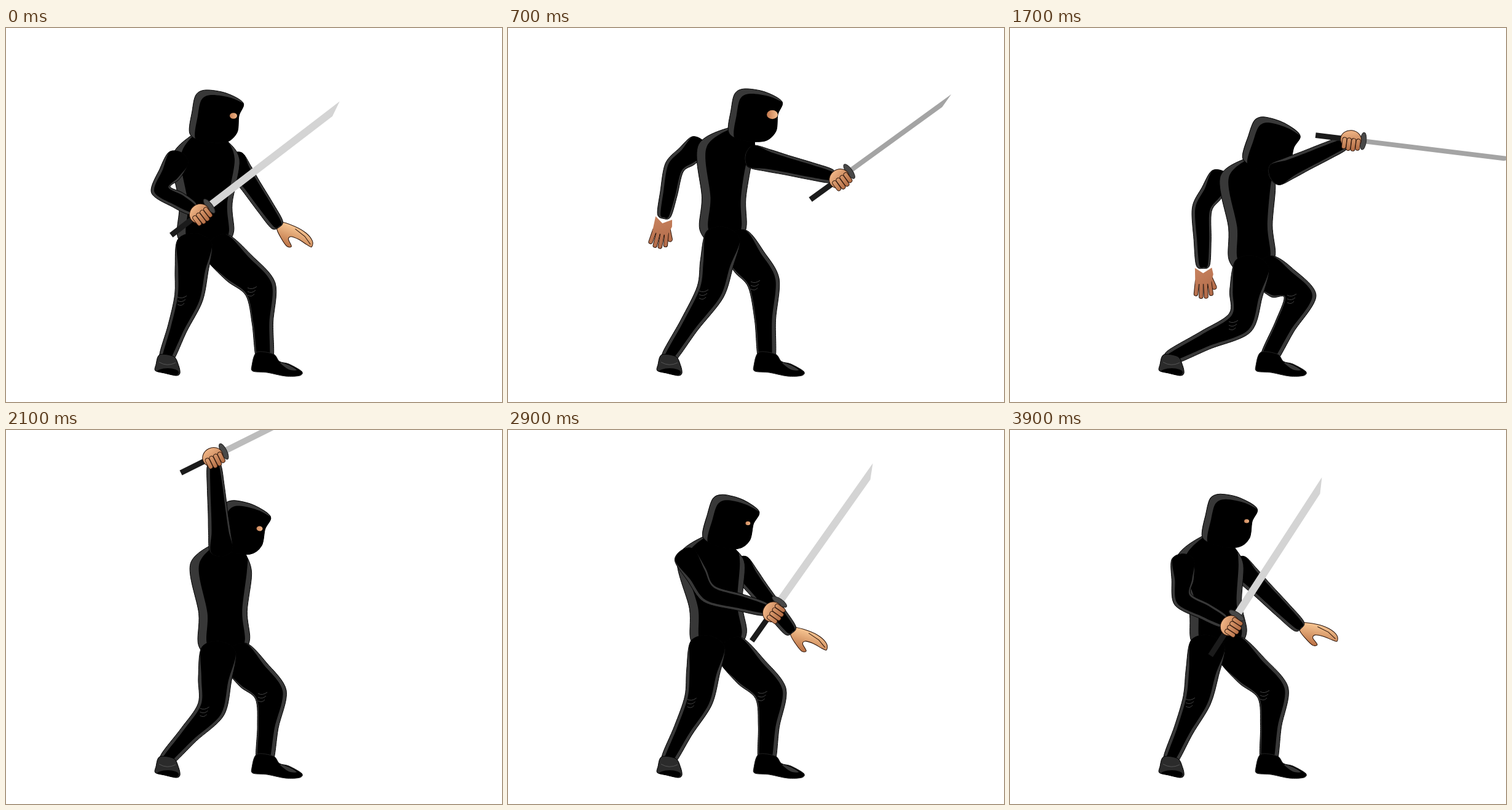
These frames come from a looping animation (807x609 px, 4 s). An HTML page with a canvas:

```html
<!DOCTYPE html>
<html lang="en">
<head>
<meta charset="utf-8">
<title>Sword practice</title>
<style>
html, body { margin: 0; width: 100%; height: 100%; overflow: hidden; background: #fff; }
canvas { display: block; width: 807px; height: 609px; }
</style>
</head>
<body>
<canvas id="stage" width="807" height="609"></canvas>
<script>
const g = document.getElementById('stage').getContext('2d');
const LOOP = 4000, STEP = 100;
const RIM = '#383838', INK = '#000', SKIN_LINE = '#2b150b';
const BACK_ANKLE = [261, 537], FRONT_ANKLE = [421, 537];

// turn: 0 faces us, 1 shows the back. grip: degrees and distance from the chest.
// blade: degrees, length. flex: how far the sword elbow sticks out.
const poses = {
  ready: { head: [342, 145, 0], chest: [325, 212], hips: [325, 335], knees: [297, 440, 414, 425],
    wrist: [441, 320], grip: [96, 90], blade: [-37.5, 272], turn: [0], flex: [-46], eye: [6] },
  raised: { head: [344, 129, .03], chest: [313, 200], hips: [316, 318], knees: [293, 430, 390, 425],
    wrist: [420, 325], grip: [194, 182], blade: [-60, 270], turn: [0], flex: [0], eye: [10] },
  cut: { head: [402, 143, 0], chest: [353, 205], hips: [350, 325], knees: [329, 430, 416, 415],
    wrist: [254, 305], grip: [372, 191], blade: [-36, 208], turn: [1], flex: [0], eye: [9] },
  coil: { head: [434, 194, .3], chest: [385, 240], hips: [370, 365], knees: [368, 478, 435, 427],
    wrist: [222, 292], grip: [424, 101], blade: [-91, 184], turn: [1], flex: [20], eye: [3] },
  sweep: { head: [425, 191, .15], chest: [387, 250], hips: [394, 372], knees: [374, 480, 472, 437],
    wrist: [314, 386], grip: [338, 182], blade: [7, 255], turn: [1], flex: [0], eye: [0] },
  low: { head: [365, 154, .12], chest: [333, 215], hips: [347, 338], knees: [312, 442, 433, 430],
    wrist: [465, 326], grip: [429, 122], blade: [-54, 272], turn: [0], flex: [-36], eye: [3] },
  rest: { head: [357, 149, .05], chest: [325, 215], hips: [340, 335], knees: [304, 440, 428, 428],
    wrist: [470, 319], grip: [432, 108], blade: [-57, 264], turn: [0], flex: [-38], eye: [4] }
};

const smooth = k => k * k * (3 - 2 * k), strike = k => k * k;
const beats = [
  [0, 'ready'], [300, 'raised'], [420, 'raised'], [700, 'cut', strike], [1100, 'coil'],
  [1300, 'coil'], [1700, 'sweep'], [1800, 'sweep'], [2400, 'raised'], [2550, 'raised'],
  [3000, 'low'], [3300, 'low'], [3900, 'rest']
];

const mix = (a, b, k) => a.map((v, i) => v + (b[i] - v) * k);
const add = ([x, y], dx, dy) => [x + dx, y + dy];
const polar = (deg, r) => [r * Math.cos(deg * Math.PI / 180), r * Math.sin(deg * Math.PI / 180)];

function unit(a, b) {
  const dx = b[0] - a[0], dy = b[1] - a[1], d = Math.hypot(dx, dy) || 1;
  return [dx / d, dy / d];
}

function poseAt(t) {
  const i = beats.findIndex(b => b[0] > t), at = i < 0 ? beats.length - 1 : i;
  const [t0, from] = beats[at - 1], [t1, to, ease = smooth] = beats[at];
  const k = ease(Math.min(1, (t - t0) / (t1 - t0))), out = {};
  for (const part in poses[from]) out[part] = mix(poses[from][part], poses[to][part], k);
  return out;
}

// Closed smooth curve through the points
function loop(p) {
  const path = new Path2D(), n = p.length, at = i => p[(i + n) % n];
  path.moveTo(...p[0]);
  for (let i = 0; i < n; i++) {
    const [a, b, c, d] = [at(i - 1), at(i), at(i + 1), at(i + 2)];
    path.bezierCurveTo(
      b[0] + (c[0] - a[0]) / 6.5, b[1] + (c[1] - a[1]) / 6.5,
      c[0] - (d[0] - b[0]) / 6.5, c[1] - (d[1] - b[1]) / 6.5, ...c);
  }
  return path;
}

function polygon(...pts) {
  const path = new Path2D();
  pts.forEach(p => path.lineTo(...p));
  path.closePath();
  return path;
}

function oval(x, y, rx, ry) {
  const path = new Path2D();
  path.ellipse(x, y, rx, ry, 0, 0, 7);
  return path;
}

function shape(path, fill, line) {
  g.fillStyle = fill;
  g.fill(path);
  if (!line) return;
  g.strokeStyle = line;
  g.lineWidth = 1;
  g.stroke(path);
}

function within(path, paint) {
  g.save();
  g.clip(path);
  paint();
  g.restore();
}

function placed([x, y], angle, paint, scale = 1) {
  g.save();
  g.translate(x, y);
  g.rotate(angle);
  g.scale(scale, scale);
  paint();
  g.restore();
}

// Outline around a chain of points with a half width at each
function tube(chain, widths) {
  const left = [], right = [], last = chain.length - 1;
  chain.forEach((p, i) => {
    const [ux, uy] = unit(chain[Math.max(0, i - 1)], chain[Math.min(last, i + 1)]), w = widths[i];
    if (i === 0) left.push(add(p, -ux * w / 2, -uy * w / 2));
    left.push(add(p, uy * w, -ux * w));
    right.unshift(add(p, -uy * w, ux * w));
    if (i === last) left.push(add(p, ux * w / 2, uy * w / 2));
  });
  return loop([...left, ...right]);
}

// Grey cloth with its black shade inside
function cloth(chain, widths, rim, dx = 0) {
  const outer = tube(chain, widths);
  shape(outer, RIM, INK);
  within(outer, () => shape(
    tube(chain.map(p => add(p, dx, 0)), widths.map((w, i) => i ? w - rim : w)), INK));
}

function leg(hip, knee, ankle, widths, rim, dx) {
  cloth([hip, mix(hip, knee, .5), knee, mix(knee, ankle, .5), ankle], widths, rim, dx);
  g.strokeStyle = '#444';
  g.lineWidth = 1;
  g.beginPath();
  for (let i = 0; i < 3; i++) {
    const [x, y] = add(knee, 5 - widths[2], i * 6 - 2);
    g.moveTo(x, y);
    g.quadraticCurveTo(x + 7, y + 4, x + 15 - i * 2, y - 2);
  }
  g.stroke();
}

function bend(from, to, flex) {
  const [ux, uy] = unit(from, to);
  return add(mix(from, to, .4), uy * flex, -ux * flex);
}

function arm(shoulder, elbow, wrist) {
  cloth([shoulder, mix(shoulder, elbow, .5), elbow, mix(elbow, wrist, .55), wrist],
    [18, 18, 16, 14, 11], 4, 1);
}

function gradient(x0, y0, x1, y1, ...colours) {
  const s = g.createLinearGradient(x0, y0, x1, y1);
  colours.forEach((c, i) => s.addColorStop(i, c));
  return s;
}

function finger(x0, y0, x1, y1, w, fill) {
  g.lineCap = 'round';
  for (const [width, colour] of [[w + 1.8, SKIN_LINE], [w, fill]]) {
    g.lineWidth = width;
    g.strokeStyle = colour;
    g.beginPath();
    g.moveTo(x0, y0);
    g.lineTo(x1, y1);
    g.stroke();
  }
}

function pointingHand() {
  shape(loop([[4, -4], [27, 2], [45, 12], [55, 24], [54, 33], [47, 30], [34, 22], [22, 18],
    [18, 22], [23, 33], [16, 33], [7, 21], [0, 7]]),
    gradient(20, 0, 10, 30, '#f6c491', '#bd7447'), SKIN_LINE);
  g.beginPath();
  g.moveTo(28, 6);
  g.lineTo(43, 17);
  g.lineTo(52, 29);
  g.stroke();
}

function hangingHand() {
  const tone = gradient(-10, 0, 14, 40, '#c98460', '#b36c4a');
  finger(9, 17, 16, 33, 6, tone);
  for (let i = -1.5; i < 2; i++) finger(i * 6, 24, i * 7.5, 47 - i * i * 2, 5, tone);
  shape(polygon([-12, 4], [0, 12], [13, 4], [15, 14], [11, 28], [-12, 28]), tone);
}

function freeHand(elbow, wrist, open) {
  const aim = Math.atan2(wrist[1] - elbow[1], wrist[0] - elbow[0]);
  if (open) placed(wrist, aim - Math.PI / 2, hangingHand, 1.1);
  else placed(wrist, aim - .95, pointingHand, 1.06);
}

// Sword parts use the fist as origin, with the blade along x
function blade(length, turn) {
  const w = 6 - 2 * turn, tip = 19 + length, v = 212 - 48 * turn;
  shape(polygon([19, -w], [tip, -w], [tip - 24, w], [19, w]), `rgb(${v},${v},${v})`);
}

function hilt() {
  g.fillStyle = '#1b1b1b';
  g.fillRect(-59, -4.5, 78, 9);
  shape(oval(19, 0, 5, 14), '#484848', '#222');
  const tone = gradient(0, -15, 8, 17, '#efb485', '#b26b43');
  shape(oval(-1, 0, 17, 15), tone, SKIN_LINE);
  for (let i = -1.5; i < 2; i++) finger(i * 7.5, 1, i * 7.5, 15 - i * i, 6, tone);
}

function hood(eye) {
  const points = [[-43, 27], [-39, -10], [-33, -36], [-17, -44], [16, -39], [44, -23], [37, -2],
    [34, 25], [16, 41], [-20, 40]];
  const outer = loop(points);
  shape(outer, RIM, INK);
  within(outer, () => {
    shape(loop(points.map(p => add(p, 9, 8))), INK);
    if (eye > .5) shape(oval(28, -2, eye, eye * .8), gradient(20, 0, 36, 0, '#c67b50', '#f3bd8e'));
  });
}

function feet() {
  shape(loop([[408, 528], [400, 550], [402, 559], [425, 561], [455, 567], [478, 566], [481, 559],
    [460, 547], [445, 543], [435, 531]]), INK, '#222');
  shape(loop([[446, 545], [460, 549], [473, 557], [460, 556]]), RIM);
  const sole = loop([[250, 532], [244, 548], [243, 558], [258, 562], [277, 566], [283, 562],
    [281, 550], [273, 535]]);
  shape(sole, '#2b2b2b', INK);
  within(sole, () => shape(oval(263, 561, 18, 7), INK));
  g.strokeStyle = '#555';
  g.beginPath();
  g.moveTo(249, 544);
  g.quadraticCurveTo(262, 552, 276, 545);
  g.stroke();
}

function draw(t) {
  const { head, chest, hips, knees, wrist, grip, blade: [tilt, length], turn: [turn],
    flex: [flex], eye: [eye] } = poseAt(t);
  const neck = add(head, -14, 30), waist = mix(chest, hips, .6), crotch = add(hips, 8, 25);
  const [ux, uy] = unit(neck, waist), side = 44 * (1 - 2 * turn);
  const freeShoulder = add(chest, uy * side, -ux * side);
  const lift = 14 * (1 - polar(grip[0], 1)[1]);
  const swordShoulder = add(chest, -uy * side, ux * side - lift);
  const palm = add(chest, ...polar(...grip));
  const swordElbow = bend(swordShoulder, palm, flex);
  const toElbow = unit(palm, swordElbow);
  const freeElbow = bend(freeShoulder, wrist, -20 * turn);
  const behind = turn > .5 && grip[0] > 400;
  const inHand = paint => placed(palm, tilt * Math.PI / 180, paint);
  const drawBlade = () => inHand(() => blade(length, turn));

  g.fillStyle = '#fff';
  g.fillRect(0, 0, 807, 609);
  if (behind) drawBlade();

  freeHand(freeElbow, wrist, turn > .5);
  arm(freeShoulder, freeElbow, wrist);
  cloth([neck, chest, waist, hips, crotch],
    [24, 55, 43, 46, 28].map(w => w * (1 - .17 * turn)), 11, 3);
  leg(add(hips, 18, 20), knees.slice(2), FRONT_ANKLE, [26, 29, 26, 17, 14], 4, -2);
  leg(add(hips, -18 * (1 - turn), 13), knees.slice(0, 2), BACK_ANKLE, [28, 27, 23, 16, 12], 5, 0);
  feet();
  placed(head, head[2], () => hood(eye));

  arm(swordShoulder, swordElbow, add(palm, toElbow[0] * 14, toElbow[1] * 14));
  if (!behind) drawBlade();
  inHand(hilt);
}

function tick() {
  draw(Math.floor(performance.now() % LOOP / STEP) * STEP);
  requestAnimationFrame(tick);
}
tick();
</script>
</body>
</html>
```
